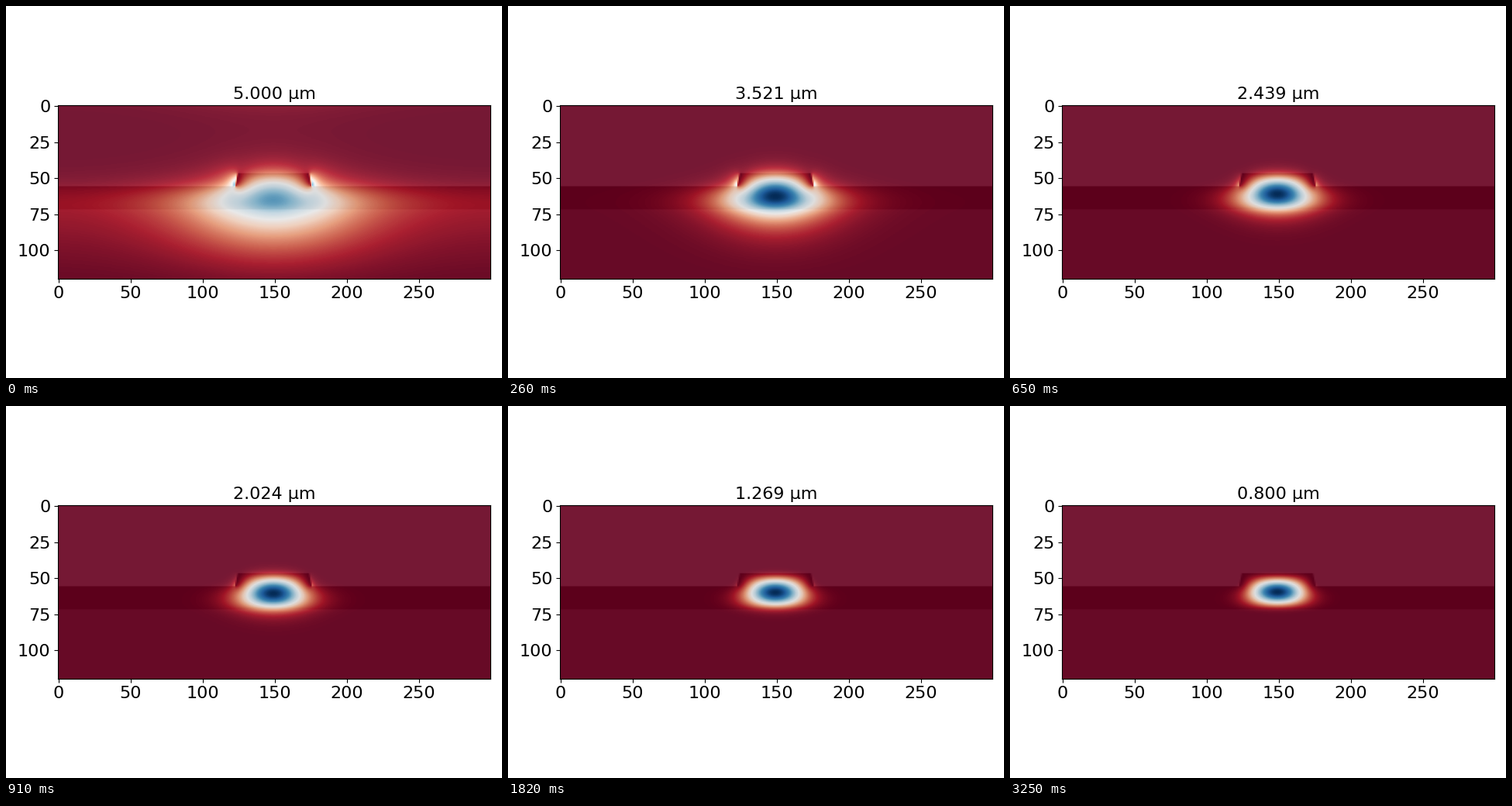
A matplotlib script that plays this animation: 640 px wide and 480 px high, repeating every 3.38 s.

```python
import numpy as np
import matplotlib.pyplot as plt
from matplotlib.animation import FuncAnimation

# Fundamental mode of a ridge waveguide, swept evenly in frequency.
FRAMES, INTERVAL = 26, 130
NX, NY, MID = 300, 120, 149      # grid size and column of mirror symmetry
HALF = NX // 2 + 1               # columns from the centre to the cell edge
STEP = 0.04                      # grid spacing in micrometres
RIDGE_TOP, SLAB_TOP, SLAB_END = 47, 56, 72

WAVELENGTHS = 1 / np.linspace(1 / 5.0, 1 / 0.8, FRAMES)


def sellmeier(wl, terms):
    return 1 + sum(b * wl**2 / (wl**2 - c) for b, c in terms)


def film_eps(wl):
    return sellmeier(wl, [(2.9804, 0.02047), (0.5981, 0.0666), (8.9543, 416.08)])


def base_eps(wl):
    return sellmeier(wl, [(1.4313, 0.00528), (0.65055, 0.01424), (5.3414, 325.02)])


def ridge_fill():
    """Share of each ridge cell inside the slanted walls, as (column, row)."""
    rows = np.arange(RIDGE_TOP, SLAB_TOP)
    reach = 24.7 + 0.22 * (rows - RIDGE_TOP + 0.5)
    return np.clip(reach - np.arange(HALF)[:, None] + 0.5, 0, 1)


def permittivity(wl, harmonic):
    film, fill = film_eps(wl), ridge_fill()
    eps = np.ones((HALF, NY))
    eps[:, SLAB_TOP:SLAB_END] = film
    eps[:, SLAB_END:] = base_eps(wl)
    if harmonic:
        eps[:, RIDGE_TOP:SLAB_TOP] = 1 / (fill / film + 1 - fill)
    else:
        eps[:, RIDGE_TOP:SLAB_TOP] = fill * film + 1 - fill
    return eps


def unfold(half):
    """Mirror the half cell into the whole picture, rows first."""
    return half[np.abs(np.arange(NX) - MID)].T


def solve_mode(wl, start, rounds=25):
    """Horizontal field by inverse iteration with block elimination."""
    eps = permittivity(wl, True)
    k2 = (2 * np.pi * STEP / wl) ** 2
    eye = np.eye(NY)
    lap = np.roll(eye, 1, 0) + np.roll(eye, -1, 0) - 2 * eye
    shift = np.linalg.eigvalsh(lap + np.diag(k2 * eps[0]))[-1]

    # The normal field jumps at vertical walls, eps times field does not.
    pad = np.pad(eps, ((1, 1), (0, 0)), mode="reflect")
    before, after = pad[:-2], pad[2:]
    left = 2 * before / (eps + before)
    right = 2 * after / (eps + after)
    diag = shift - k2 * eps + 2 * eps / (eps + before) + 2 * eps / (eps + after)
    right[0] += left[0]
    left[-1] += right[-1]

    inv = np.empty((HALF, NY, NY))
    for j in range(HALF):
        block = np.diag(diag[j]) - lap
        if j:
            block -= left[j][:, None] * inv[j - 1] * right[j - 1]
        inv[j] = np.linalg.inv(block)

    u = start
    for _ in range(rounds):
        v = np.empty_like(u)
        v[0] = inv[0] @ u[0]
        for j in range(1, HALF):
            v[j] = inv[j] @ (u[j] + left[j] * v[j - 1])
        for j in range(HALF - 2, -1, -1):
            v[j] += inv[j] @ (right[j] * v[j + 1])
        u = np.abs(v) / np.abs(v).max()
    return u


def sweep():
    """Field intensity of every frame, scaled to the colour range."""
    fields, u = [], np.ones((HALF, NY))
    for i, wl in enumerate(WAVELENGTHS):
        u = solve_mode(wl, u)
        # At long waves the wall hot spots outshine the core.
        peak = min(1, 0.76 + 0.21 * i)
        power = u**2 - (u**2).min()
        fields.append(unfold(power / power[0].max() * peak))
    return fields


FIELDS = sweep()

fig = plt.figure(figsize=(6.4, 4.8), dpi=100, facecolor="white")
ax = fig.add_axes([67.1 / 640, 128.42 / 480, 557.9 / 640, 223.16 / 480])
image = ax.imshow(FIELDS[0], cmap="RdBu", vmin=0, vmax=1, aspect="auto")
ax.imshow(unfold(permittivity(1.0, False)), cmap="binary", alpha=0.1, aspect="auto")
ax.set_xticks(range(0, 300, 50))
ax.set_yticks(range(0, 120, 25))
ax.tick_params(labelsize=16)
title = ax.set_title("", fontsize=16)


def update(i):
    image.set_data(FIELDS[i])
    title.set_text(f"{WAVELENGTHS[i]:.3f} \u00b5m")
    return image, title


anim = FuncAnimation(fig, update, frames=FRAMES, interval=INTERVAL,
                     init_func=lambda: update(0), repeat=True, repeat_delay=0)
plt.show()
```
